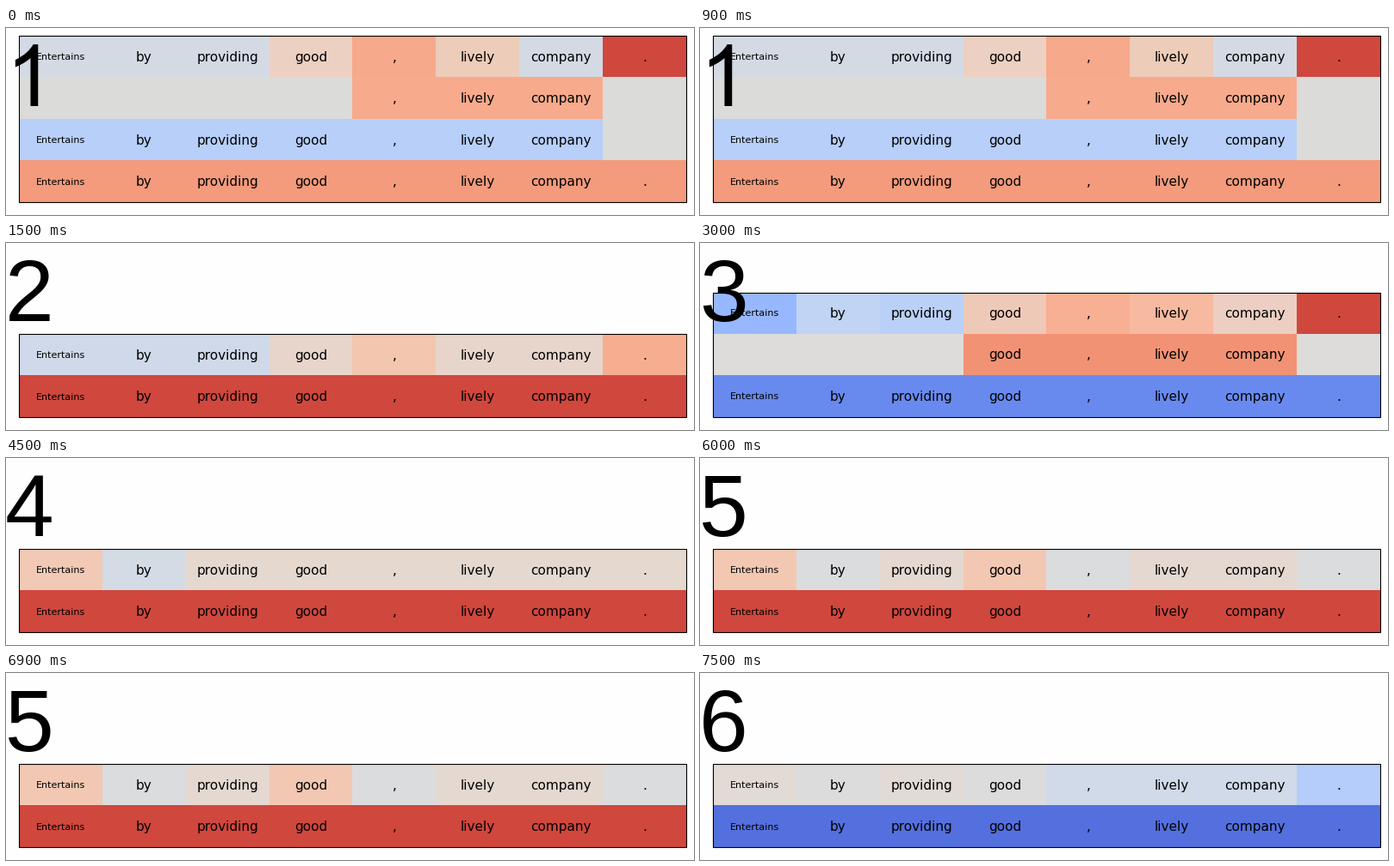
A matplotlib script for the animation above (8000 ms loop, 799 px wide and 218 px high).

```python
import math

import matplotlib.pyplot as plt
from matplotlib.animation import FuncAnimation
from matplotlib.patches import PathPatch, Rectangle
from matplotlib.path import Path

W, H, DPI = 799, 218, 100
LEFT, RIGHT, BOTTOM = 15, 790, 203
CELL_W, CELL_H = 96.875, 48.5
STEP_MS, STEPS_PER_SCENE, STEPS = 500, 3, 16
WORDS = ["Entertains", "by", "providing", "good", ",", "lively", "company", "."]


def cells(spec):
    """Expand 'colour*count ...' into one colour per cell."""
    out = []
    for part in spec.split():
        color, _, count = part.partition("*")
        out += ["#" + color] * int(count or 1)
    return out


def row(spec, first=0, last=8):
    """Colours of a row plus the range of words it shows."""
    return cells(spec), first, last


FULL_RED = row("d0473d*8")

# Rows run from top to bottom.
SCENES = [
    [row("d4dae4*3 ecd0c2 f7a98b edccb9 d4dae4 d0473d"),
     row("dbdbda*4 f7aa8c*3 dbdbda", 4, 7),
     row("b7cff9*7 dbdbda", 0, 7),
     row("f39b7c*8")],
    [row("cfd9ea*3 e7d5cb f2c6af e7d5cb*2 f7ae90"), FULL_RED],
    [row("97b8ff c1d4f4 bbd0f7 efc9b8 f7b093 f7baa0 eccfc2 d0473d"),
     row("dddcda*3 f29274*4 dddcda", 3, 7),
     row("688aef*8")],
    [row("f2c9b4 d3dbe5 e4d8cf*6"), FULL_RED],
    [row("f2c8b3 dbdcde e4d8d0 f2c8b3 dbdcde e4d8d0*2 dbdcde"), FULL_RED],
    [row("e2dad4 dcdcdc e2dad4 dcdcdc d0dae9*3 b5cdfa"), row("5470de*8")],
]

fig = plt.figure(figsize=(W / DPI, H / DPI), dpi=DPI, facecolor="#fefefe")
ax = fig.add_axes([0, 0, 1, 1])


def edge_x(col):
    return int(LEFT + 0.4 + CELL_W * col)


def edge_y(level):
    return int(BOTTOM - CELL_H * level)


def draw_row(level, top, base, colors, first, last):
    """Draw one row; top is the frame's upper edge, base the text grid's foot."""
    y0, y1 = max(edge_y(level + 1), top), edge_y(level)
    for col, color in enumerate(colors):
        x0, x1 = edge_x(col), edge_x(col + 1)
        ax.add_patch(Rectangle((x0, y0), x1 - x0, y1 - y0,
                               color=color, lw=0, antialiased=False))
    for col in range(first, last):
        ax.text(LEFT + 0.17 + CELL_W * (col + 0.5),
                base - CELL_H * (level + 0.5), WORDS[col],
                size=8 if col == 0 else 11, family="DejaVu Sans",
                ha="center", va="center")


def draw_one(baseline):
    """A figure one without a foot."""
    points = [(763, 0), (583, 0), (583, 1147), (518, 1085), (412, 1023),
              (307, 961), (223, 930), (223, 1104), (374, 1175), (487, 1276),
              (600, 1377), (647, 1472), (763, 1472), (763, 0)]
    codes = ([Path.MOVETO] + [Path.LINETO] * 2 + [Path.CURVE3] * 4
             + [Path.LINETO] + [Path.CURVE3] * 4 + [Path.LINETO, Path.CLOSEPOLY])
    scale = 100 / 2048
    outline = [(x * scale, baseline - y * scale) for x, y in points]
    ax.add_patch(PathPatch(Path(outline, codes), color="black", lw=0, zorder=5))


def draw_number(n):
    if n == 1:
        draw_one(91)
    else:
        ax.text(-1.2, 91, str(n), size=102 * 72 / DPI, family="Liberation Sans",
                ha="left", va="baseline", zorder=5)


def draw(step):
    ax.clear()
    ax.set(xlim=(0, W), ylim=(H, 0))
    ax.axis("off")
    scene = step // STEPS_PER_SCENE
    rows = SCENES[scene]
    height = CELL_H * len(rows)
    top = round(BOTTOM - height)
    base = math.ceil(BOTTOM + 0.5 - height) + height
    for i, data in enumerate(rows):
        draw_row(len(rows) - 1 - i, top, base, *data)
    ax.add_patch(Rectangle((LEFT, top), RIGHT - LEFT, BOTTOM - top,
                           fill=False, ec="black", lw=0.8, snap=True, zorder=4))
    draw_number(scene + 1)
    return []


anim = FuncAnimation(fig, draw, frames=STEPS, init_func=lambda: [],
                     interval=STEP_MS, repeat=True, repeat_delay=0)
plt.show()
```
